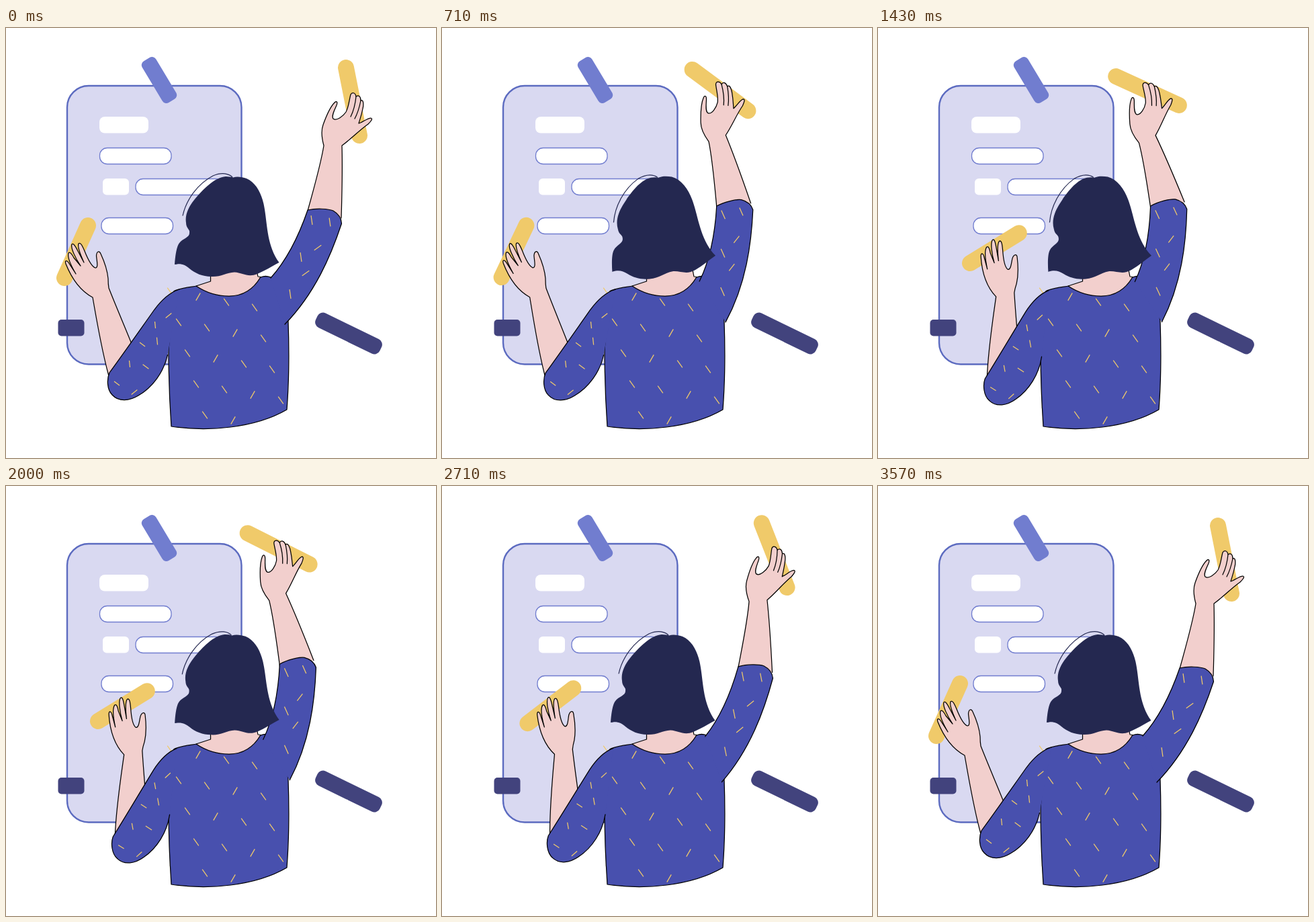
Animation, 640 px wide and 640 px high, one loop 3640 ms. Source, as an HTML page:

```html
<!DOCTYPE html>
<html lang="en">
<head>
<meta charset="utf-8">
<title>Woman pinning up a form</title>
<style>
  html, body { margin: 0; width: 100%; height: 100%; overflow: hidden; background: #fff; }
  svg { display: block; width: 100%; height: 100%; }
  .ink { fill: none; stroke: #000; stroke-width: 1.25; stroke-linecap: round; stroke-linejoin: round; }
  .skin { fill: #f2cfcd; }
  .shirt { fill: #4850ae; }
  .hair { fill: #242850; }
  .strand { fill: none; stroke: #242850; stroke-width: 1.2; }
  .stick { stroke: #f0ca6a; stroke-width: 24; stroke-linecap: round; }
  .dash { fill: none; stroke: #f0ca6a; stroke-width: 1.25; }
  .field { fill: #fff; stroke: #717dcf; stroke-width: 1.3; }
  .plain { fill: #fff; }
  .clip { fill: #717dcf; }
  .navy { fill: #42437d; }
</style>
</head>
<body>
<svg viewBox="0 0 640 640">
  <g id="board">
    <rect x="91" y="86" width="259.5" height="414.5" rx="32" fill="#d9d9f1" stroke="#5c6bc0" stroke-width="2.4"/>
    <rect class="clip" x="192" y="65.5" width="72" height="24" rx="7" transform="rotate(59 228 77.5)"/>
    <rect class="plain" x="139" y="132" width="73" height="24.5" rx="8"/>
    <rect class="plain" x="144" y="224" width="39" height="24.5" rx="6"/>
    <rect class="field" x="139.5" y="178.5" width="106.5" height="24" rx="11"/>
    <rect class="field" x="193" y="224.5" width="130" height="24" rx="11"/>
    <rect class="field" x="142" y="282.5" width="106.5" height="24" rx="11"/>
    <rect class="navy" x="77.5" y="434" width="39" height="24.5" rx="5"/>
    <rect class="navy" x="457" y="442.5" width="106" height="24" rx="9" transform="rotate(26 510 454.5)"/>
  </g>

  <g id="torso">
    <path class="ink shirt" d="M242 478L250 391.5C260 387 272 386 284 384L379 371Q386 368 394 371L412 385L420 436C421.5 480 421 530 418 568C370 596 300 601 246 593C243 550 242 510 242 478Z"/>
    <path id="torsoDash" class="dash"/>
    <path class="ink skin" d="M304.5 350V377L283 384C298 394 315 399 332 399C356 399 370 386 379 370.5L375 370L371 350"/>
  </g>

  <g id="leftArm">
    <g id="leftFore">
      <path id="leftStick" class="stick" d="M87 372L122 294"/>
      <path class="ink skin" d="M153 518C142 478 135 435 129 401C112 392 99 376 89 351C87 345 91 346 93 349L104 366C97 354 91 341 93 335C95 332 99 338 101 342L111 354C103 342 96 327 98 322C100 319 104 326 107 332L116 349C111 338 106 326 108 321C111 318 114 325 117 332C121 342 127 355 133 357C138 357 135 346 134.5 339C135 332 139 331 141 336C147 349 151 362 152 373Q152 381 153 387C164 415 177 445 187 470"/>
    </g>
    <path class="ink shirt" d="M240.5 486.5C235 512 218 535 197 547C184 555 168 557 158 546C150 538 150 522 154 513C176 483 206 440 221 419C233 403 245 393 258 389"/>
    <path id="leftDash" class="dash"/>
  </g>

  <g id="rightArm">
    <g id="rightFore">
      <path id="rightStick" class="stick" d="M506 59L526 160"/>
      <path class="ink skin" d="M449 272C458 240 469 200 473 175C470 164 469 152 472 144C477 130 483 117 489 111C492 108 494 110 492 115C489 122 484 131 487 135C492 139 502 131 506 125C510 118 511 106 513 99C515 95 520 96 521 102C525 99 528 102 528 108C533 106 532 116 531 120C529 130 527 135 525 142C531 140 538 134 543 134C547 135 542 140 539 143C526 152 514 165 500 175C501 210 500 250 499 283"/>
      <path class="ink" d="M521 102C520 112 518 122 513 132M528 108C526 118 524 126 519 135"/>
    </g>
    <path class="ink shirt" d="M394 372C420 343 438 303 449 271C462 268 480 269 487 272Q499 279 499.5 291C484 338 460 395 415 441"/>
    <path id="rightDash" class="dash"/>
  </g>

  <g id="head">
    <path class="hair" d="M251 352C252 338 254 325 258 320C263 313 274 312 273 304C274 300 268 298 268 290C266 278 272 266 280 256C293 240 311 222 327 221Q334 221 338 222.5C344 220.5 352 222 358 224C374 231 382 250 385 270C389 295 389 325 406.5 349C395 355 386 361 374 366C360 372 352 364 340 363.5C328 364 319 371 305 370C293 370 281 365 273 358C267 353 261 350 251 352Z"/>
    <path class="strand" d="M263 279.5C268 256 285 232 308 220C322 214 332 217 337 222"/>
  </g>
</svg>
<script>
const LOOP = 3640;
const $ = id => document.getElementById(id);

// Evenly spaced dashes whose angles (degrees) repeat in turn.
function dashRow(x, y, stepX, stepY, count, length, angles) {
  let d = "";
  for (let i = 0; i < count; i++) {
    const a = angles[i % angles.length] * Math.PI / 180;
    const dx = length * Math.cos(a), dy = length * Math.sin(a);
    d += `M${x + stepX * i - dx / 2} ${y + stepY * i - dy / 2}l${dx} ${dy}`;
  }
  return d;
}

function drawShirt() {
  const down = 54, up = -60;
  let torso = "";
  for (let r = -1; r <= 3; r++) {
    torso += dashRow(257 + 13 * r, 438 + 46 * r, 42, 8, r < 3 ? 4 : 2, 13,
      r % 2 ? [down, up, down] : [down, down, up, down]);
  }
  $("torsoDash").setAttribute("d", torso);
  $("leftDash").setAttribute("d",
    dashRow(222, 442, -19, 29, 4, 10, [84, 37]) +
    dashRow(242, 428, -17, 38, 4, 11, [-38, 84, 37]));
  $("rightDash").setAttribute("d",
    dashRow(455, 286, -16, 55, 3, 14, [82]) +
    dashRow(482, 289, -18, 38, 3, 13, [82, -36, -36]));
}

function ease(t, from, to) {
  const u = Math.min(1, Math.max(0, (t - from) / (to - from)));
  return u * u * (3 - 2 * u);
}
// Out between a and b, back between c and d.
const swing = (t, a, b, c, d) => ease(t, a, b) - ease(t, c, d);
const turn = (id, deg, x, y) =>
  $(id).setAttribute("transform", `rotate(${deg.toFixed(3)} ${x} ${y})`);

function draw(t) {
  const shoulder = swing(t, 0, 850, 1860, 3040);
  const wrist = swing(t, 0, 1100, 1860, 3040);
  const left = swing(t, 620, 1400, 2402, 3577);
  const nod = swing(t, 0, 700, 1430, 2140);

  turn("rightArm", -16.9 * shoulder, 407, 414);
  turn("rightFore", -7.1 * wrist, 474, 281);
  turn("rightStick", -30.2 * wrist, 516, 109.5);

  turn("leftArm", -4.2 * left, 279, 446);
  turn("leftFore", 22.2 * left, 176, 525);
  turn("leftStick", 16.2 * left, 104.5, 333);

  turn("head", -7.8 * nod, 332, 340);
}

drawShirt();
const start = performance.now();
function tick() {
  draw((performance.now() - start) % LOOP);
  requestAnimationFrame(tick);
}
tick();
</script>
</body>
</html>
```
